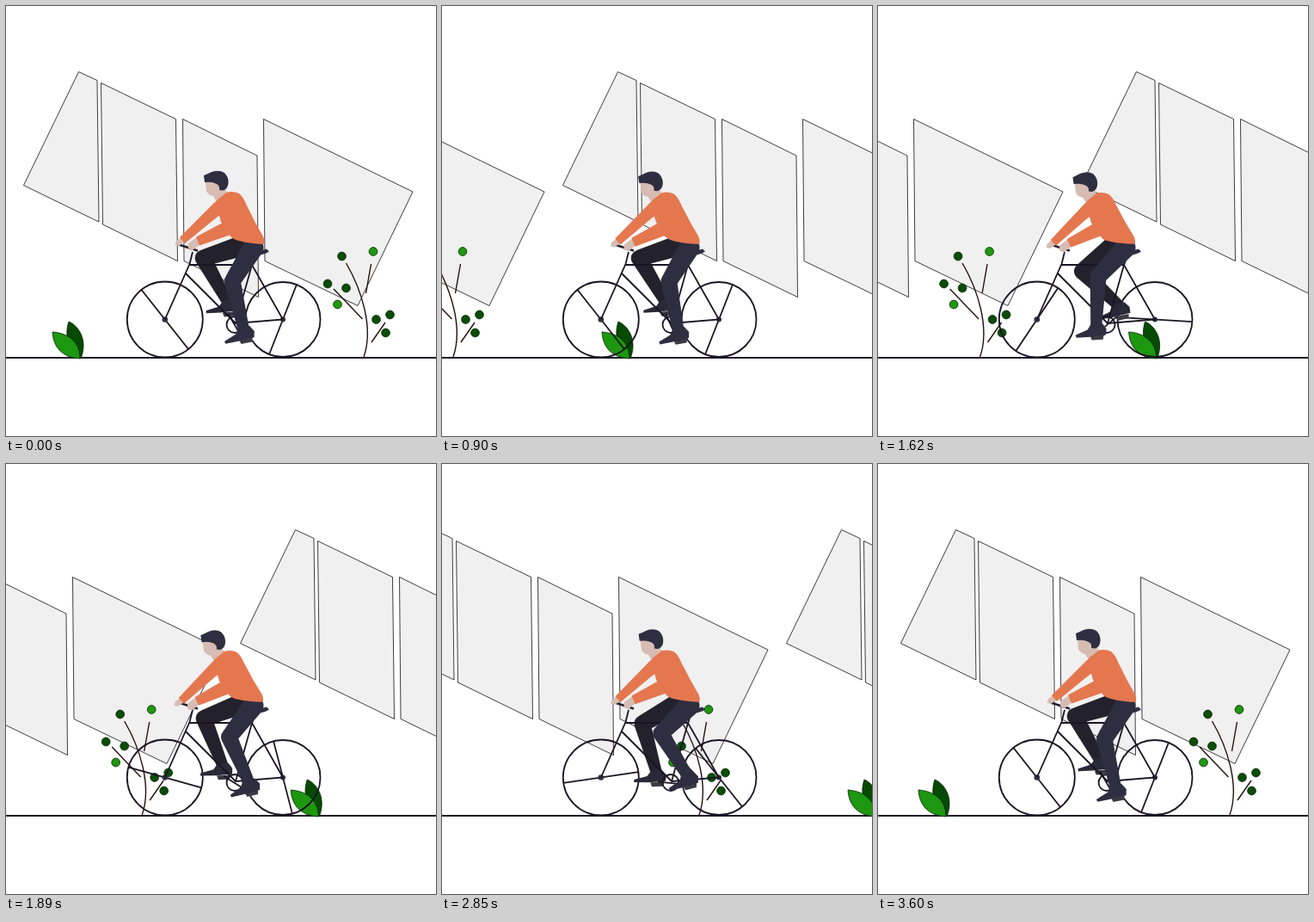
Animation, 500 px wide and 500 px high, one loop 3.63 s. Source, as an HTML page:

```html
<!DOCTYPE html>
<html lang="en">
<head>
<meta charset="utf-8">
<title>Cyclist</title>
<style>
html, body { margin: 0; width: 100%; height: 100%; overflow: hidden; background: #fff; }
svg { display: block; width: 500px; height: 500px; }
</style>
</head>
<body>
<svg viewBox="0 0 500 500">
  <defs>
    <g id="panels" fill="#f0f0f0" stroke="#000" stroke-width=".75">
      <path d="M84.5 76.500L106 86.500L108 251L20.500 208.500Z"/>
      <path d="M110.500 89.500L197.500 131.500L199.500 296.500L112.500 254Z"/>
      <path d="M205.500 131.500L292 174L293.500 338.500L207 296.500Z"/>
      <path d="M299.500 131.500L473 216L409 348.500L301 296.500Z"/>
    </g>
    <g id="plants">
      <g stroke="#061f04" stroke-width=".8">
        <path fill="#064a03" d="M73 367C83 371 96 387 87 410C74 403 67 385 73 367Z"/>
        <path fill="#1c970f" d="M54 379C68 380 86 387 86 410C67 409 55 398 54 379Z"/>
      </g>
      <g fill="none" stroke="#24100f" stroke-width="1.4">
        <path d="M395.500 299C413 329 428 374 416 408"/>
        <path d="M424.500 300L418.500 334M381 329L414.500 364M441 368L425 391"/>
      </g>
      <g id="berries" stroke="#0a2c06" stroke-width=".8"></g>
    </g>
  </defs>
  <use id="panelA" href="#panels"/>
  <use id="panelB" href="#panels"/>
  <path d="M0 409H500" stroke="#191526" stroke-width="1.8"/>
  <use id="plantA" href="#plants"/>
  <use id="plantB" href="#plants"/>

  <g fill="none" stroke="#1a1424" stroke-width="1.8">
    <circle cx="184.800" cy="364.500" r="44"/>
    <circle cx="322" cy="364.500" r="43.500"/>
    <path id="frontSpoke" d="M140.800 364.500H228.800"/>
    <path id="rearSpoke" d="M278.500 364.500H365.500"/>
  </g>
  <g fill="#2f2e41">
    <circle cx="184.800" cy="364.500" r="3.300"/>
    <circle cx="322" cy="364.500" r="3"/>
  </g>

  <g id="far">
    <path class="pedal" fill="#3b3a44" d="M-7 11L9 10L8 15L-5 16Z"/>
    <path class="leg" fill="#23222c"/>
    <path class="shoe" fill="#2a2938" d="M-6-3L6-4L11 2L11 9L-9 11L-26 11.500L-26 8.500L-11 4Z"/>
  </g>

  <g fill="none" stroke="#1a1424" stroke-width="1.8">
    <path d="M184.800 364.500L213.500 300L217 286M213.500 301H287M209 311L267 369L322 364.500L286 301L267 369M286 302L290 288"/>
    <circle cx="266" cy="370.500" r="9.500"/>
    <path id="crank"/>
  </g>
  <path d="M201 277.500L223 284.500" stroke="#23202e" stroke-width="2.600"/>
  <path d="M280 283Q293 286 303 282.500L306 285.500Q300 290 285 290Z" fill="#2f2e41"/>

  <g id="near">
    <path class="pedal" fill="#3b3a44" d="M-7 11L9 10L8 15L-5 16Z"/>
    <path class="leg" fill="#2f2e41"/>
    <path class="shoe" fill="#2f2e41" d="M-6-3L7-4L12 3L11 10L-9 12.500L-23 13.500L-24 10.500L-10 4Z"/>
  </g>

  <g id="body">
    <g fill="#d6bcb3">
      <path d="M232 204L233 215Q235 220 241 221L245 228L259 220L250 206Z"/>
      <path d="M205 268L198 273L196.500 277.500L201 279L210 273Z"/>
      <path d="M222 269L212 276L212 282L217 284L226 277Z"/>
    </g>
    <path fill="#2f2e41" d="M231 205L230 197Q235 195 239 193Q248 190 254 194Q259 199 258.500 206Q258 213 252 214.500L248 214Q249 209 245 207Q240 204 231 205Z"/>
    <g fill="#e5774f">
      <path d="M246 225L257 216.500Q265 215 271 218Q276 222 279 230L290 252L299 268Q301 272 300 277Q282 276 271 273Q262 271 260 266L250 251L247 240Z"/>
      <path d="M249 223L242 229L202 269L208 276L246 245L262 236Z"/>
      <path d="M250 253L221 268.500L225 278.500L264 265L272 245Z"/>
    </g>
    <path fill="#fff" fill-opacity="0" d="M0 0"/>
  </g>
</svg>
<script>
const LOOP = 3630, STEP = 30, CYCLE = 3600;
const $ = id => document.getElementById(id);
const set = (id, transform) => $(id).setAttribute('transform', transform);
const slide = (id, x) => set(id, `translate(${x.toFixed(2)} 0)`);

const DARK = '#0b4c07', LIGHT = '#1f970f';
$('berries').innerHTML = [
  [390.5, 291, DARK], [427, 285.500, LIGHT], [374, 323, DARK], [395.500, 328, DARK],
  [385.500, 347, LIGHT], [430.500, 364.500, DARK], [446.500, 359, DARK], [441.500, 380, DARK]
].map(([x, y, c]) => `<circle cx="${x}" cy="${y}" r="4.900" fill="${c}"/>`).join('');

const dot = ([x, y], r) =>
  `M${x - r} ${y}a${r} ${r} 0 1 1 ${2 * r} 0a${r} ${r} 0 1 1 ${-2 * r} 0Z`;

// Tapered segment between two joints, wound like the joint discs
function segment([ax, ay], [bx, by], ra, rb) {
  const d = Math.hypot(bx - ax, by - ay);
  const nx = (by - ay) / d, ny = -(bx - ax) / d;
  return `M${ax + nx * ra} ${ay + ny * ra}L${bx + nx * rb} ${by + ny * rb}` +
    `L${bx - nx * rb} ${by - ny * rb}L${ax - nx * ra} ${ay - ny * ra}Z`;
}

// Knee of a two-bone leg, bent towards the handlebar
function kneeOf([hx, hy], [ax, ay], thigh, shin) {
  const dx = ax - hx, dy = ay - hy;
  const d = Math.min(Math.hypot(dx, dy), thigh + shin - 0.1);
  const along = (thigh * thigh - shin * shin + d * d) / (2 * d);
  const out = Math.sqrt(Math.max(0, thigh * thigh - along * along));
  return [hx + (dx * along - dy * out) / d, hy + (dy * along + dx * out) / d];
}

function poseLeg(id, hip, angle, thigh, shin) {
  const ankle = [267.5 + 18 * Math.cos(angle), 361 + 18 * Math.sin(angle)];
  const knee = kneeOf(hip, ankle, thigh, shin);
  const part = name => $(id).querySelector('.' + name);
  part('leg').setAttribute('d',
    dot(hip, 12) + segment(hip, knee, 12, 9.5) + dot(knee, 9.5) +
    segment(knee, ankle, 9.5, 6.5) + dot(ankle, 6.5));
  const tilt = -4 - 6 * Math.cos(angle);
  const place = `translate(${ankle}) rotate(${tilt})`;
  part('shoe').setAttribute('transform', place);
  part('pedal').setAttribute('transform', place);
}

function draw(t) {
  const wall = t * 4 / 30, bush = t * 4.4 / 30;
  slide('panelA', wall);
  slide('panelB', wall - 474);
  slide('plantA', bush);
  slide('plantB', bush - 535);

  const spin = -0.4 * t;
  set('frontSpoke', `rotate(${51.7 + spin} 184.8 364.5)`);
  set('rearSpoke', `rotate(${111.5 + spin} 322 364.5)`);

  const turn = (60 + spin + 8 * Math.sin(Math.PI * t / CYCLE)) * Math.PI / 180;
  poseLeg('near', [287.5, 281], turn, 46, 58);
  poseLeg('far', [274, 279], turn + Math.PI, 47, 60);
  const cx = 15 * Math.cos(turn), cy = 15 * Math.sin(turn);
  $('crank').setAttribute('d', `M${266 - cx} ${371 - cy}L${266 + cx} ${371 + cy}`);

  const lean = (1 - Math.cos(2 * Math.PI * t / CYCLE)) / 2;
  set('body', `translate(${-lean} 0) rotate(${-1.9 * lean} 295 280)`);
}

const start = performance.now();
function tick() {
  const t = (performance.now() - start) % LOOP;
  draw(Math.floor(t / STEP) * STEP);
  requestAnimationFrame(tick);
}
tick();
</script>
</body>
</html>
```
